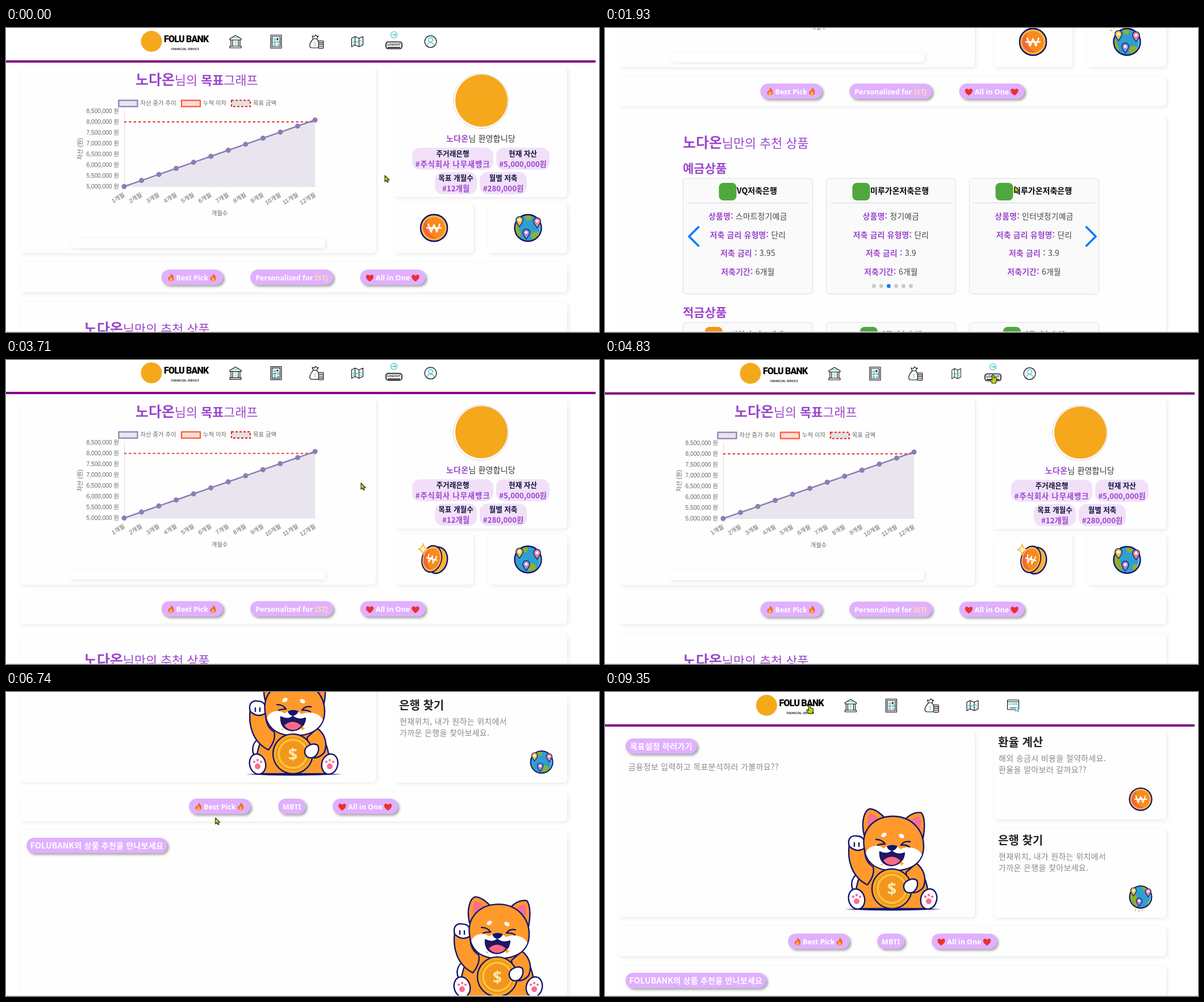
Recreate the animation shown at these times as an HTML page. Size 1044 px wide and 536 px high, loop 9.42 s.

```html
<!DOCTYPE html>
<html lang="ko">
<head>
<meta charset="utf-8">
<title>Bank dashboard</title>
<style>
html, body { margin: 0; width: 100%; height: 100%; overflow: hidden; background: #fff; }
svg { display: block; width: 100%; height: 100%; }
text { font-family: "Noto Sans CJK KR", "Noto Sans", sans-serif; }
.latin { font-family: "Noto Sans", "Open Sans", sans-serif; }
.chart text { font-family: "Liberation Sans", "Noto Sans CJK KR", sans-serif; fill: #666; }
.card { fill: #fefefe; filter: drop-shadow(2px 2px 3px #00000016); }
.pill { fill: #e0b0ff; filter: drop-shadow(3px 3px 2px #00000058); }
.icon { fill: none; stroke: #111; stroke-width: 1.2; stroke-linejoin: round; }
.icon .teal { stroke: #25bfc9; }
.navy { stroke: #12146e; stroke-width: 2.4; stroke-linejoin: round; stroke-linecap: round; }
</style>
</head>
<body>
<svg id="stage" viewBox="0 0 1044 536"></svg>
<script>
const LOOP = 9420;
const PURPLE = '#9a46cc';
const USER = '노다온', BRAND = 'FOLU BANK';

// ---- drawing helpers ----
const text = (x, y, s, size, fill = '#333', extra = '') =>
  `<text x="${x}" y="${y + size * .36}" font-size="${size}" fill="${fill}" ${extra}>${s}</text>`;
const MID = 'text-anchor="middle"', BOLD = 'font-weight="700"', LOOSE = 'letter-spacing=".35"';
const rect = (x, y, w, h, r, extra) => `<rect x="${x}" y="${y}" width="${w}" height="${h}" rx="${r}" ${extra}/>`;
const card = (x, y, w, h) => rect(x, y, w, h, 6, 'class="card"');
const circle = (x, y, r, fill, extra = '') => `<circle cx="${x}" cy="${y}" r="${r}" fill="${fill}" ${extra}/>`;
const oval = (x, y, rx, ry, fill, extra = '') => `<ellipse cx="${x}" cy="${y}" rx="${rx}" ry="${ry}" fill="${fill}" ${extra}/>`;
const path = (d, fill = 'none', extra = '') => `<path d="${d}" fill="${fill}" ${extra}/>`;
const at = (x, y, body, extra = '', more = '') => `<g transform="translate(${x} ${y}) ${more}" ${extra}>${body}</g>`;
const range = (n, f) => Array.from({ length: n }, (_, i) => f(i)).join('');

// ---- header ----
const icons = {
  bank: path('M-10 -5L0 -11L10 -5V-3H-10ZM-8 -3V8M-5 -3V8M5 -3V8M8 -3V8M-10 8H10V11H-10Z') +
    path('M-5 -7H5', 'none', 'class="teal"') + text(0, 2, '$', 9, '#25bfc9', MID + ' stroke="none"'),
  list: rect(-9.5, -11.5, 19, 23, 0, '') + rect(-7, -9, 14, 18, 0, '') +
    path('M-4 -5h3v3h-3zM2 -1h3v3h-3zM-4 4h3v3h-3z', 'none', 'class="teal"') + path('M1 -6l3 3m0-3l-3 3M-5 1h5M2 6h3'),
  money: path('M-6 -5C-15 5 -13 11 -8 11H2C7 9 5 1 0 -5ZM-6 -5L-8 -10L-4 -9L-2 -12L1 -9L3 -10L0 -5') +
    text(-3, 4, '$', 8, '#25bfc9', MID + ' stroke="none"') +
    range(4, i => rect(3, 8.5 - i * 3.2, 9, 3.2, 1.4, 'fill="#fff"')),
  map: path('M-10 -6L-4 -9L3 -6L10 -9V6L3 9L-4 6L-10 9Z') + path('M-4 -9V6M3 -6V9') +
    path('M-8 1l4-3 3 4 4-5 5 3M5 3l3 2M-8 5l2-1', 'none', 'class="teal"'),
  logout: circle(0, -12, 5.5, 'none', 'class="teal"') + path('M-3 -12H3M1 -14L3 -12L1 -10', 'none', 'class="teal"') +
    rect(-14, .5, 28, 12, 4, 'stroke-width="1.7"') + path('M-11 10.3H11', 'none', 'stroke-width="1.7"') +
    text(0, 5, 'LOGOUT', 5.6, '#111', MID + ' font-weight="900" stroke="none" class="latin"'),
  profile: circle(0, 0, 10.3, 'none') + circle(0, -3, 3.8, 'none', 'class="teal"') + path('M-6 7C-5 0 5 0 6 7', 'none', 'class="teal"'),
  login: rect(-10, -10, 20, 17, 1, '') + path('M-10 -7H10M-6 4H3') +
    text(0, -3, 'LOGIN', 5, '#25bfc9', MID + ' font-weight="700" stroke="none" class="latin"') +
    path('M4 3L10 5L8 7L10 10L8 11L6 8L4 10Z', '#fff', 'class="teal"')
};
const header = (dx, names, width = 1038) => {
  const logo = circle(256, 23.5, 18.5, '#f5a81c') +
    text(278, 19.5, BRAND, 16, '#000', 'font-weight="900" letter-spacing="-.8" style="font-family:Roboto,sans-serif"') +
    text(291, 37, 'FINANCIAL SERVICE', 4.4, '#111', 'class="latin" font-weight="700" letter-spacing=".35"');
  const row = names.map((n, i) =>
    at(n === 'logout' ? 683 : 404 + i * 71.5 - (i === 5 ? 14 : 0), 24, `<g class="${n}">${icons[n]}</g>`, 'class="icon"'));
  return at(dx, 0, logo + row.join('')) + rect(0, 57, width, 4, 0, 'fill="#800080"');
};
const GUEST = ['bank', 'list', 'money', 'map', 'login'];

// ---- small pictures ----
const flame = (x, y) => at(x, y,
  path('M0 -7C4 -4 5 -1 5 2C5 8 -5 8 -5 2C-5 0 -4 -1 -3 -2C-2 0 -1 -1 0 -7Z', '#f4632a') +
  path('M0 -1C4 3 3 6 0 6.5C-3 6 -4 3 0 -1Z', '#ffb52e'));
const heart = (x, y) => at(x, y, path('M0 6.5C-12 -1 -5 -9.5 0 -3.5C5 -9.5 12 -1 0 6.5Z', '#ea3030'));
const pill = (x, y, w, s, extra = '') =>
  rect(x, y, w, 27, 13.5, 'class="pill"') + text(x + w / 2, y + 13.5, s, 14, '#fff', `${MID} ${BOLD} ${extra}`);
const LABEL = 'class="latin" style="font-size:12.5px"';
const bestPick = x => pill(x, 426, 108.5, 'Best Pick', LABEL) + flame(x + 17, 440) + flame(x + 91, 440);
const allInOne = x => pill(x, 426, 115, 'All in One', LABEL) + heart(x + 17, 440.5) + heart(x + 97.5, 440.5);

const coin = (x, y, k) => at(x, y, `<g class="coin">
  <ellipse class="back navy" ry="23.5" fill="#f9b43a"/>
  <g class="front"><circle r="23.5" fill="#fbb93f" class="navy"/><circle r="19" fill="#f88a1f"/>
  ${path('M-15 12A19 19 0 0 1 -9 -17A23 23 0 0 0 6 18A19 19 0 0 1 -15 12Z', '#f2653f')}
  ${path('M-10 -6.5L-5 7L0 -5.5L5 7L10 -6.5M-12.5 0H12.5', 'none', 'stroke="#fff" stroke-width="2.4" stroke-linejoin="round" stroke-linecap="round"')}</g></g>
  ${path('M-19 -27Q-17 -20 -11 -18Q-17 -16 -19 -10Q-21 -16 -27 -18Q-21 -20 -19 -27Z', '#fff3c9', 'class="spark" stroke="#f6b545" stroke-width="1.8"')}`, '', `scale(${k})`);
const pin = (x, y, c) => at(x, y, path('M0 11C-4 5 -7 2 -7 -2A7 7 0 0 1 7 -2C7 2 4 5 0 11Z', c, 'stroke="#12306e" stroke-width="1.8"') + circle(0, -2, 2.8, '#fff'), '', 'scale(.88)');
const rays = (name, x, y, turn) => at(x, y, path('M-6 0L-8 -4M0 -2V-6M6 0L8 -4', 'none', 'stroke="#f7b23c" stroke-width="2"'),
  `class="${name}"`, `rotate(${turn})`);
const globe = (x, y, k) => at(x, y, circle(0, 0, 23.5, '#2f9fd2') +
  `<g clip-path="url(#disc)"><g class="land">
  ${path('M-32 -8C-24 -14 -16 -6 -16 4C-10 10 -12 18 -20 22L-32 18ZM-4 -26C6 -26 8 -18 4 -14C-2 -10 -8 -18 -4 -26ZM6 10C14 4 22 8 20 16C16 24 2 22 6 10Z', '#8fb02c')}</g>
  ${path('M8 -24A24 24 0 0 1 8 24A30 30 0 0 0 8 -24Z', '#8fe0f0', 'opacity=".6"')}</g>` +
  circle(0, 0, 23.5, 'none', 'class="navy"') + pin(-15, -12, '#fcc04a') + pin(16, -10, '#f5829a') + pin(-3, 10, '#a787e0') +
  path('M-2 18Q18 17 28 6', 'none', 'class="streak" stroke="#f9c65c" stroke-width="2.4"') +
  rays('yellow', -21, -22, -30) + rays('pink', 23, -18, 35) + rays('violet', -4, 26, 180), '', `scale(${k})`);

const mascot = () => {
  const O = '#ff992b', W = '#fff', P = '#f66f92', n = 'class="navy"';
  const foot = (x, d) => oval(x, 365, 14, 18, W, n + ` transform="rotate(${d} ${x} 365)"`) + oval(x, 369, 5, 5, P) +
    range(3, i => circle(x - 6 + i * 6, 361 - (i === 1 ? 3 : 0), 2.2, P));
  return path('M422 383Q507 378 592 383Q507 388 422 383Z', '#12146e') +
    path('M450 318C430 325 430 350 445 358L460 330Z', W, n) +
    path('M462 300C442 330 436 360 446 382H566C576 352 562 322 548 300Z', O, n) +
    path('M548 302C562 312 567 330 560 345Q548 358 535 352L530 318Z', O, n) +
    path('M430 268C426 296 434 326 462 340Q476 322 472 308C458 300 456 284 457 266Z', O, n) +
    path('M430 272C426 258 434 252 444 254C456 254 460 266 456 276Q443 284 430 272Z', W, n) + path('M439 266V272M447 266V272', 'none', n) +
    path('M456 252C450 226 458 208 466 206C476 206 488 216 494 224Z', O, n) + path('M463 238C460 222 464 214 468 214C474 216 480 222 484 226Z', P) +
    path('M528 225C538 214 550 211 557 213C564 222 563 242 560 258Z', O, n) + path('M538 227C546 219 552 218 555 222C557 230 556 238 554 245Z', P) +
    path('M456 272C452 244 472 220 506 219C542 219 562 246 561 274C560 304 534 316 505 315C476 314 458 300 456 272Z', O, n) +
    path('M459 284C464 270 482 268 491 276Q505 262 520 277C532 271 552 274 558 287C550 307 530 314 505 313.5C480 313 465 303 459 284Z', W) +
    oval(491, 252, 5, 3.5, W, 'transform="rotate(-30 491 252)"') + oval(522, 254, 5, 3.5, W, 'transform="rotate(30 522 254)"') +
    path('M477 260Q488 260 493 268Q485 268 480 270M537 264Q526 262 521 270Q530 269 536 273', 'none', n) +
    path('M484 282Q483 304 504 306Q525 304 527 284Q515 289 505 281Q496 288 484 282Z', '#25165e', n) +
    path('M490 297Q504 284 520 297Q514 305 504 305Q495 304 490 297Z', '#fa6b86') +
    path('M496 272Q505 267 515 272Q512 279 505 280Q498 279 496 272Z', '#12146e') +
    foot(443, -14) + foot(570, 14) +
    circle(505, 347, 35, '#f9a91e', n) + circle(505, 347, 28, '#ffc03d', 'stroke="#e98a18" stroke-width="2"') + circle(505, 347, 23, '#f2961d') +
    text(505, 347, '$', 29, '#ffe7a8', `${MID} ${BOLD} class="latin"`) +
    path('M526 345C524 334 540 326 549 332C553 342 546 355 536 354Q528 354 526 345Z', W, n) +
    path('M522 297l1.5 3.5 3.5 1.5-3.5 1.5-1.5 3.5-1.5-3.5-3.5-1.5 3.5-1.5z', '#f9a91e') + circle(487, 304, 1.5, '#f9a91e');
};

// ---- dashboard ----
const chart = () => {
  const px = i => 208 + i * 30.55, py = i => 279.5 - i * 10.66;
  const line = Array.from({ length: 12 }, (_, i) => `${px(i)} ${py(i)}`).join('L');
  const key = (x, stroke, fill, label, dash = '') =>
    rect(x, 127.5, 33, 11, 0, `fill="${fill}" stroke="${stroke}" stroke-width="2.2" ${dash}`) + text(x + 38, 132, label, 10.4);
  return `<g class="chart">` +
    key(198.5, '#8e7cb5', '#e9e5ee', '자산 증가 추이') + key(309, '#ff5436', '#fddcd6', '누적 이자') +
    key(397, '#e8201c', '#e2e2e2', '목표 금액', 'stroke-dasharray="4 3"') +
    range(8, i => text(199, 146 + i * 19.05, `${(8.5 - i / 2).toFixed(1).replace('.', ',')}00,000 원`, 10.2, '', 'text-anchor="end"')) +
    path('M208.5 146V279.5H546', 'none', 'stroke="#dcdcdc"') +
    path(`M${line}V279.5H208Z`, '#e9e5ee') + path('M208 165.5H544', 'none', 'stroke="#e8201c" stroke-width="1.8" stroke-dasharray="4.2 4.2"') +
    path(`M${line}`, 'none', 'stroke="#8e7cb5" stroke-width="2.5"') +
    range(12, i => circle(px(i), py(i), 4.5, '#8e7cb5')) +
    range(12, i => at(px(i), 293, text(0, 0, `${i + 1}개월`, 10.4, '', 'text-anchor="end"'), '', 'rotate(-31)')) +
    text(376, 326, '개월수', 10.4, '', MID) + at(130, 213, text(0, 0, '자산 (원)', 10.4, '', MID), '', 'rotate(-90)') + '</g>';
};
const tag = (x, y, w, label, value, extra = '') => rect(x, y, w, 39, 14, 'fill="#f2e0f9"') +
  text(x + w / 2, y + 10, label, 12.6, '#0c1238', `${MID} ${BOLD}`) +
  text(x + w / 2, y + 29.5, '#' + value, 13.3, PURPLE, `${MID} ${BOLD} ${extra}`);
const span = (s, fill, more = '') => `<tspan fill="${fill}" ${more}>${s}</tspan>`;
const title = (x, y, rest) =>
  text(x, y, span(USER, PURPLE, 'font-size="25" font-weight="700"') + rest, 21.8, PURPLE, 'font-weight="300"');

const bankCard = (i, y, name, width, color, item, rate) => {
  const x = 137 + i * 252, c = x + 114.5, left = c - (31 + width) / 2;
  const row = (dy, k, v) => text(c, y + dy, span(k, PURPLE, BOLD) + ' ' + v, 13.8, '#444', `${MID} font-weight="500" letter-spacing=".25"`);
  return rect(x + .5, y, 228, 204, 5, 'fill="#fafafa" stroke="#dedede"') +
    rect(left, y + 8, 31, 31, 8, `fill="${color}"`) + text(left + 31.5, y + 21.5, name, 14, '#000', BOLD) +
    path(`M${x + 8} ${y + 43.5}h214`, 'none', 'stroke="#d5d2de"') +
    row(67, '상품명:', item) + row(100, '저축 금리 유형명:', '단리') + row(132.5, '저축 금리 :', rate) + row(165, '저축기간:', '6개월');
};
const SHORT = ['VQ저축은행', 71], LONG = ['미루가온저축은행', 105];
const slides = [[...SHORT, '정기예금', 3.95], [...SHORT, '인터넷정기예금', 3.95], [...SHORT, '스마트정기예금', 3.95],
  [...LONG, '정기예금', 3.9], [...LONG, '인터넷정기예금', 3.9], [...LONG, '스마트정기예금', 3.9]];
const GREEN = '#4fa83d';

const dashboard = header(0, ['bank', 'list', 'money', 'map', 'logout', 'profile']) +
  card(24, 69, 627, 328) + title(228, 92.5, '님의 ' + span('목표', PURPLE, BOLD) + '그래프') +
  chart() + rect(114, 371, 448, 17, 5, 'class="card"') +
  card(684, 69, 304, 229) + circle(836, 129, 48.5, '#fff', 'stroke="#d5d5dc"') + circle(837, 128, 46, '#f5a81c') +
  text(775, 194.5, span(USER, PURPLE, BOLD) + '님 환영합니당', 14, '#333', 'letter-spacing=".2"') +
  tag(715, 211, 143, '주거래은행', '주식회사 나무새뱅크', 'letter-spacing=".9"') + tag(863, 211, 94, '현재 자산', '5,000,000원') +
  tag(755, 254, 74, '목표 개월수', '12개월') + tag(834, 254, 83, '월별 저축', '280,000원') +
  card(684, 308, 139, 89) + coin(753.5, 352.5, 1) + card(849, 308, 139, 89) + globe(919, 352.5, 1) +
  card(24, 413, 964, 53) + bestPick(273.5) +
  pill(430, 426, 146, 'Personalized for ' + span('ISTJ', '#fbdcae'), LABEL) + allInOne(623.5) +
  card(24, 482, 964, 640) + title(137, 531, '님만의 추천 상품') +
  text(137, 575, '예금상품', 21, PURPLE, BOLD) +
  `<g clip-path="url(#shelf)"><g id="slides">${slides.map((s, i) => bankCard(i, 593, s[0], s[1], GREEN, s[2], s[3])).join('')}</g></g>` +
  range(6, i => circle(473.5 + i * 13, 783, 3.4, '#c8c8c8', 'class="dot"')) +
  path('M164.5 679L148 695.5L164.5 712M847.5 679L864 695.5L847.5 712', 'none', 'stroke="#007aff" stroke-width="3.6" stroke-linecap="round" stroke-linejoin="round"') +
  text(137, 829.5, '적금상품', 21, PURPLE, BOLD) +
  bankCard(0, 847, '주식회사 나무새뱅크', 120, '#f7941d', '자유적금', 3.6) +
  range(2, i => bankCard(i + 1, 847, '미루저축은행', 78, GREEN, '정기적금', 3.5));

// ---- guest home and login ----
const note = (x, y, s) => text(x, y, s, 14, '#8a8a8a', LOOSE);
const home = header(28.5, GUEST) + card(24, 69, 627, 328) +
  pill(36, 82, 126, '목표설정 하러가기', 'letter-spacing=".3"') + note(41, 131.5, '금융정보 입력하고 목표분석하러 가볼까요??') + mascot() +
  card(684, 69, 304, 156) + text(692, 89, '환율 계산', 20, '#212529', 'font-weight="900"') +
  note(693, 117, '해외 송금시 비용을 절약하세요.') + note(693, 137, '환율을 알아보러 갈까요??') + coin(943, 189, .83) +
  card(684, 241, 304, 157) + text(692, 262, '은행 찾기', 20, '#212529', 'font-weight="900"') +
  note(693, 290, '현재위치, 내가 원하는 위치에서') + note(693, 310, '가까운 은행을 찾아보세요.') + globe(943, 361.5, .83) +
  card(24, 413, 964, 53) + bestPick(322) + pill(479, 426, 48.5, 'MBTI', LABEL) + allInOne(575) +
  card(24, 482, 964, 400) + pill(36, 495, 248, BRAND.replace(' ', '') + '의 상품 추천을 만나보세요', 'letter-spacing=".25"') +
  at(360, 393, mascot());

const field = (y, label, hint) => text(366, y, label, 12.4, '#333', 'class="latin" font-weight="600"') +
  rect(366.5, y + 16.5, 293, 36, 4, 'fill="#fff" stroke="#dcdcdc"') +
  path(`M369 ${y + 18}H657`, 'none', 'stroke="#ececec" stroke-width="2"') + text(375, y + 34, hint, 14, '#777');
const login = header(35, GUEST, 1044) + rect(349.5, 103, 327, 249, 8, 'class="card" stroke="#dcdcdc"') +
  field(129.5, 'Username', '아이디') + field(206.5, 'Password', '비밀번호') +
  rect(366, 273, 294, 30, 4, 'fill="#6f42c1"') + text(513, 288.5, 'LOG IN', 12.8, '#fff', `${MID} ${BOLD} class="latin"`) +
  text(513, 326, '회원가입', 14, '#6f42c1', `${MID} ${BOLD}`);

const stage = document.getElementById('stage');
stage.innerHTML = `<defs><clipPath id="disc"><circle r="23"/></clipPath>
  <clipPath id="shelf"><rect x="137" y="590" width="733.5" height="210"/></clipPath></defs>
  <g id="dash">${dashboard}</g><g id="home">${home}</g><g id="login">${login}</g>
  <path d="M0 535.5H1044" stroke="#dedede"/>
  <g id="cursor" stroke="#222" stroke-width="1.1" stroke-linejoin="round">
  ${path('M0 0V11L2.6 8.7L4.3 12.3L6.2 11.4L4.6 8H8Z', '#cfd400', 'id="arrow"')}
  ${path('M-1.5 1Q0 -1 1.5 1V5L6 6Q7 7 6.5 10L5 15H-1.5L-5 9.5Q-5 7.5 -3 8.3L-1.5 9.5Z', '#b5d60a', 'id="hand"')}</g>`;

// ---- motion ----
const $ = s => document.querySelector(s), all = s => document.querySelectorAll(s);
const clamp = x => Math.max(0, Math.min(1, x));
const ramp = (t, a, b) => clamp((t - a) / (b - a));
const smooth = x => x * x * (3 - 2 * x);
const bump = (p, a, b, c, d) => smooth(ramp(p, a, b)) - smooth(ramp(p, c, d));
const inside = (t, spans) => spans.some(([a, b]) => t >= a && t < b);
const show = (els, on) => els.forEach(e => e.setAttribute('opacity', +on));
const move = (el, x, y) => el.setAttribute('transform', `translate(${x} ${y})`);

const route = [[0, 667, 260], [1050, 665, 260], [1720, 665, 260], [1930, 721, 279], [2250, 852, 362], [2900, 852, 362],
  [3600, 625, 217], [3920, 625, 217], [4500, 683, 26], [5200, 683, 26], [5700, 673, 73], [6100, 640, 130], [7050, 238, 266],
  [7500, 236, 266], [7820, 150, 205], [7980, 84, 92], [8100, 114, 14], [8520, 360, 23], [LOOP, 360, 23]];
const handTimes = [[2180, 2950], [4400, 5760], [7000, 7400], [8450, LOOP]];
const pageStarts = [[8800, 'home'], [7300, 'login'], [5000, 'home'], [0, 'dash']];
const pages = ['dash', 'home', 'login'].map(id => $('#' + id));
const parts = Object.fromEntries(['coin', 'spark', 'land', 'map', 'streak', 'yellow', 'pink', 'violet', 'dot', 'back', 'front'].map(c => [c, [...all('.' + c)]]));

function scrollOf(t) {
  if (t < 2950) return 73.5 * ramp(t, 840, 1050) + 254.5 * ramp(t, 1050, 1750);
  if (t < 5000) return 328 * (1 - ramp(t, 2950, 3830)) ** 3;
  return t < 7300 ? 238 * smooth(ramp(t, 5950, 6750)) : 0;
}

function draw(t) {
  const [start, page] = pageStarts.find(([s]) => t >= s);
  pages.forEach(p => { p.style.display = p.id === page ? '' : 'none'; });
  move($('#' + page), 0, -scrollOf(t));

  const p = (t - start) % 2000 / 2000;
  const tilt = bump(p, .28, .34, .88, .95);
  parts.coin.forEach(e => e.setAttribute('transform', `rotate(${tilt * 14})`));
  parts.back.forEach(e => { e.setAttribute('cx', tilt * 5); e.setAttribute('rx', 23.5 - tilt * 5); });
  parts.front.forEach(e => e.setAttribute('transform', `translate(${-tilt * 4} 0) scale(${1 - tilt * .27} 1)`));
  show(parts.spark, tilt > .5);
  parts.land.forEach(e => move(e, 8 * Math.sin(p * Math.PI * 2), 0));
  parts.map.forEach(e => e.setAttribute('transform', `scale(${1 - .22 * bump(p, .28, .34, .42, .5)} 1)`));
  show(parts.streak, inside(p, [[.45, .6]]));
  show(parts.yellow, inside(p, [[.92, .99]]));
  show(parts.pink, inside(p, [[.32, .4]]));
  show(parts.violet, inside(p, [[.24, .31]]));

  const index = 1 + smooth(ramp(t, 1400, 1700)) + smooth(ramp(t, 2350, 2650));
  move($('#slides'), -252 * index, 0);
  const active = t < 1400 ? 1 : t < 2350 ? 2 : 3;
  parts.dot.forEach((e, i) => e.setAttribute('fill', i === active ? '#007aff' : '#c8c8c8'));

  const i = Math.max(1, route.findIndex(k => k[0] > t)), [a, b] = [route[i - 1], route[i]];
  const k = ramp(t, a[0], b[0]);
  move($('#cursor'), a[1] + (b[1] - a[1]) * k, a[2] + (b[2] - a[2]) * k);
  const hand = inside(t, handTimes);
  $('#hand').style.display = hand ? '' : 'none';
  $('#arrow').style.display = hand ? 'none' : '';
}

const t0 = performance.now();
function tick() {
  draw((performance.now() - t0) % LOOP);
  requestAnimationFrame(tick);
}
tick();
</script>
</body>
</html>
```
